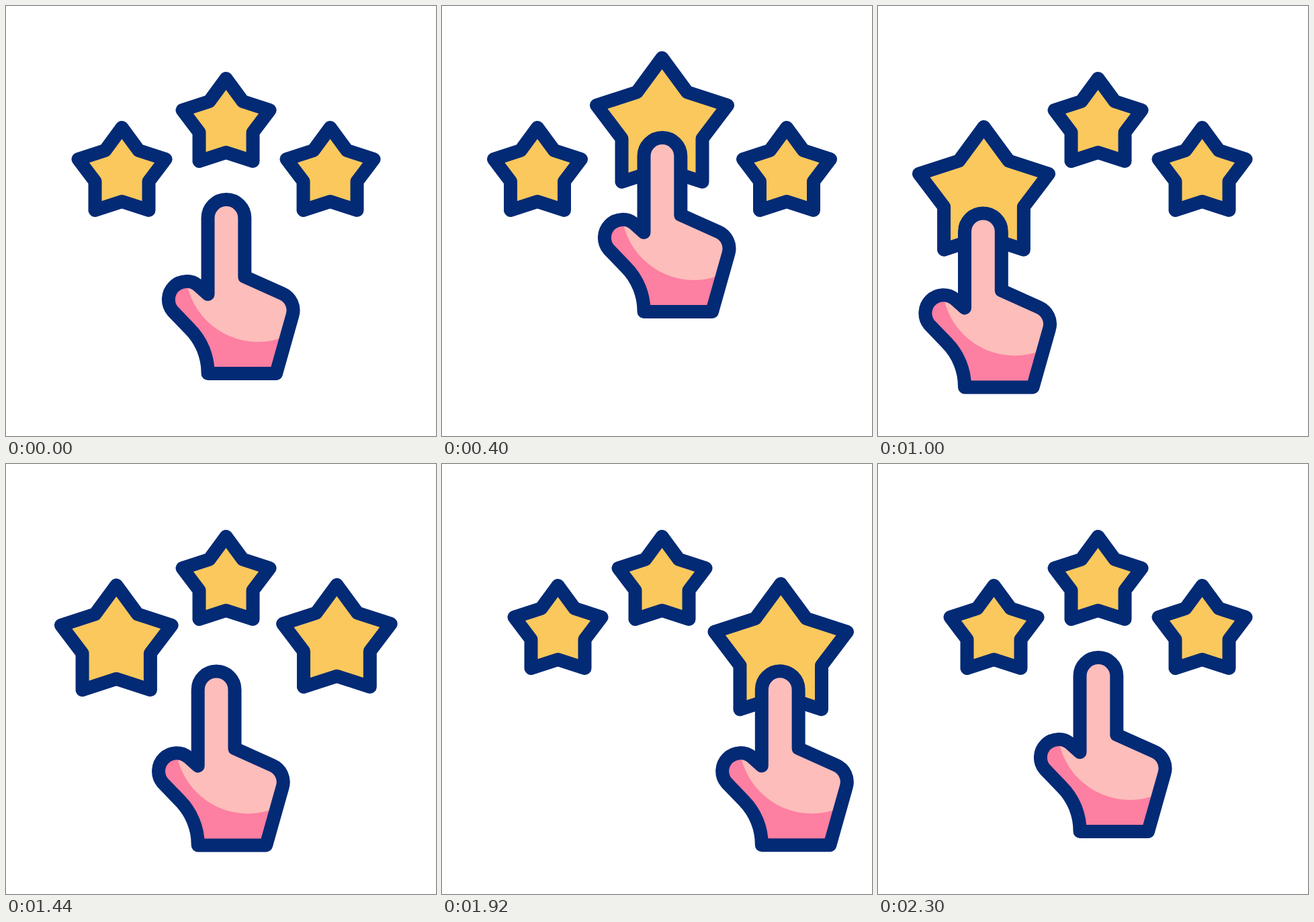
These frames come from a looping animation (640 by 640 pixels, 2.4 s). An HTML page:

```html
<!DOCTYPE html>
<html lang="en">
<head>
<meta charset="utf-8">
<title>Star rating</title>
<style>
  html, body { margin: 0; width: 100%; height: 100%; overflow: hidden; background: #fff; }
  svg { display: block; width: 100%; height: 100%; }
  .line { stroke: #032a75; stroke-width: 20; stroke-linejoin: round; stroke-linecap: round; }
  .star { fill: #fac85c; }
</style>
</head>
<body>
<svg viewBox="0 0 640 640">
  <defs>
    <path id="outline" d="M300.5 429V315.5A27.4 27.4 0 0 1 355.3 315.5V403L411.4 428.2A27 27 0 0 1 426.4 460.5L402 547H300.5A93 93 0 0 0 273.5 480.5L248 454A27 27 0 0 1 286 416Z"/>
    <clipPath id="palm"><use href="#outline"/></clipPath>
  </defs>
  <path class="line star"/>
  <path class="line star"/>
  <path class="line star"/>
  <g id="hand">
    <use href="#outline" fill="#fd7fa1"/>
    <path clip-path="url(#palm)" fill="#fdbdba" d="M267 250V392A108 108 0 0 0 483 392V250Z"/>
    <use href="#outline" class="line" fill="none"/>
  </g>
</svg>
<script>
  const LOOP = 2400, TICK = 20;

  // Right half of a star, from the top point down to the bottom notch.
  const HALF = [[0, -61.5], [25, -27.5], [65, -14.5], [40, 18.5], [40, 61.5], [0, 48.5]];
  const SHAPE = [...HALF, ...HALF.slice(1, -1).reverse().map(([x, y]) => [-x, y])];

  // Each pose: left, middle and right star as [x, y, scale], then the hand's shift.
  const left = [172.5, 242.5, 1], middle = [327.5, 169.5, 1], right = [482.5, 242.5, 1];
  const rest = [left, middle, right, [0, 0]];
  const pressMiddle = [[142, 242.5, 1], [327.5, 169.5, 1.5], [513, 242.5, 1], [0, -92]];
  const pressLeft = [[157.5, 271.3, 1.485], middle, right, [-171.5, 20.4]];
  const pressRight = [left, middle, [504.4, 272, 1.523], [176.6, 20.4]];

  const MOVES = [
    [100, 400, rest, pressMiddle],
    [700, 1000, pressMiddle, pressLeft],
    [1300, 1600, pressLeft, pressRight],
    [1900, 2300, pressRight, rest]
  ];

  const stars = document.querySelectorAll(".star");
  const hand = document.getElementById("hand");
  const ease = p => p * p * (3 - 2 * p);
  const mix = (a, b, p) => a.map((v, i) => v + (b[i] - v) * p);

  function poseAt(t) {
    const [start, end, from, to] = MOVES.findLast(m => t >= m[0]) || MOVES[0];
    const p = ease(Math.min(1, Math.max(0, (t - start) / (end - start))));
    return from.map((part, i) => mix(part, to[i], p));
  }

  const starPath = ([cx, cy, s]) =>
    "M" + SHAPE.map(([x, y]) => `${cx + x * s} ${cy + y * s}`).join("L") + "Z";

  function draw(t) {
    const pose = poseAt(t);
    stars.forEach((star, i) => star.setAttribute("d", starPath(pose[i])));
    hand.setAttribute("transform", `translate(${pose[3]})`);
  }

  const begin = performance.now();
  function frame() {
    const t = (performance.now() - begin) % LOOP;
    draw(Math.floor(t / TICK) * TICK);
    requestAnimationFrame(frame);
  }
  frame();
</script>
</body>
</html>
```
